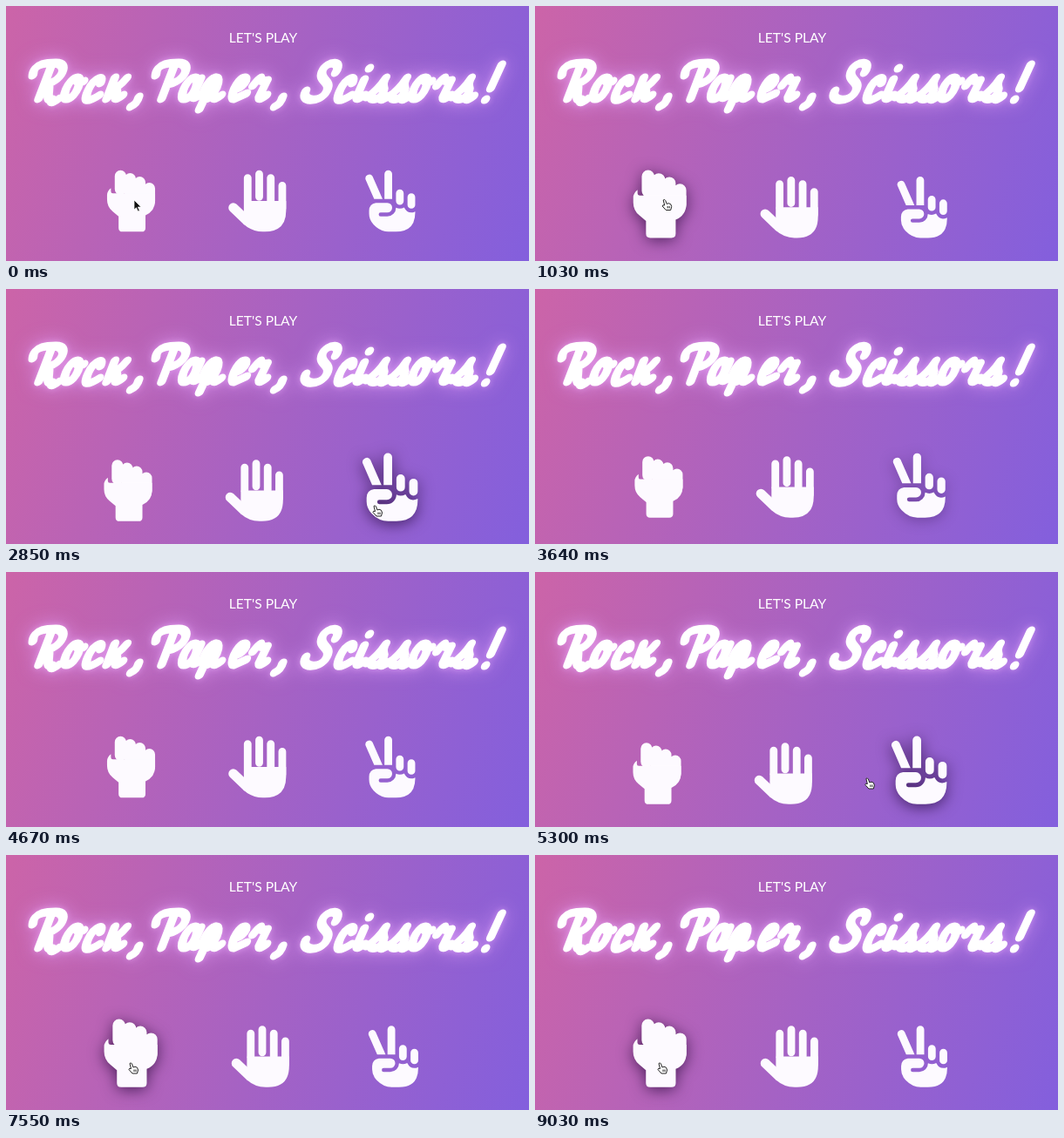
An HTML page for the animation above (9.06 s loop, 600x293 px).

```html
<!DOCTYPE html>
<html lang="en">
<head>
<meta charset="utf-8">
<title>Rock, Paper, Scissors!</title>
<style>
  html, body { margin: 0; width: 100%; height: 100%; overflow: hidden; }
  body { background: linear-gradient(108deg, #cc64a8, #a562c4 52%, #835fdd); }
  svg { display: block; width: 600px; height: 293px; }
  text { font: 15.6px Lato, "Open Sans", sans-serif; fill: #fff; text-anchor: middle; }
  #title { fill: none; stroke: #fff; stroke-width: 10; stroke-linecap: round; stroke-linejoin: round;
    filter: drop-shadow(0 0 3px #efb0ff80) drop-shadow(0 0 10px #e8a4ffa0); }
  .hand { fill: #fdfaff; }
  .fingers { fill: none; stroke: #fdfaff; stroke-linecap: round; }
  #pointer { fill: #fff; stroke: #222; stroke-linejoin: round; }
  #arrow { fill: #111; stroke: #fff; stroke-width: .7; }
</style>
</head>
<body>
<svg viewBox="0 0 600 293">
  <text x="295" y="41.8">LET'S PLAY</text>
  <g id="title" role="img" aria-label="Rock, Paper, Scissors!"></g>
  <g id="hands"></g>
  <g id="cursor">
    <path id="arrow" d="M0 0V11L2.500 8.700 4.500 13 6.300 12.200 4.400 8H8Z"/>
    <path id="pointer" d="M-4-5.500Q-2.500-7-1.500-5L0-1 2-1.800 4.500-.8 5.500 2 4.500 6H-1L-5 1.500Q-5-.5-2.500.5ZM1 1.500v2.500M3 1.500v2.500"/>
  </g>
</svg>
<script>
const LOOP = 9060, WAKE = 760, EASE = 300;
const $ = id => document.getElementById(id);

// Letters: advance and brush stroke, upright, baseline at 0
const cap = 'M2-40V-4M-15-31C-20-45-4-45 4-45C24-45 20-22 3-21';
const bowl = 'M6-28C-2-28-4-4 5-4S15-28 6-28';
const flick = 'q2 6 8-1';
const glyphs = {
  R: [30, cap + 'C13-20 8-3 17-3' + flick],
  P: [24, cap],
  S: [32, 'M20-34C24-48 4-48 4-36S20-25 18-12S-8 0-6-13'],
  o: [24, bowl + 'q4 7 10 4'],
  c: [21, 'M12-22C12-31 2-29 1-14S8-1 16-8'],
  k: [28, 'M5-28V-4M19-28Q14-16 6-15Q15-15 14-7' + flick],
  a: [24, bowl + 'M14-27L13-8' + flick],
  p: [31, 'M5-28L2 8' + bowl + 'M13-7' + flick],
  e: [22, 'M2-15C12-15 15-27 8-28S-1-4 7-4T18-10'],
  r: [26, 'M0-19Q3-27 5-28Q7-23 14-25L12-7' + flick],
  i: [17, 'M3-26L2-7' + flick + 'M4-39v.1'],
  s: [24, 'M-3-6Q6-14 10-28Q8-21 13-14C16-4 4 0 1-7M13-6' + flick],
  ',': [38, 'M13-6Q14 2 8 5'],
  '!': [10, 'M15-43L13-16M12-3v.1'],
  ' ': [5, '']
};
let pen = 34;
for (const letter of 'Rock,Paper, Scissors!') {
  const [advance, stroke] = glyphs[letter];
  $('title').innerHTML += `<path transform="translate(${pen} 110.5) skewX(-21)" d="${stroke}"/>`;
  pen += advance;
}

// Hands live on a 512-unit grid; fingers are evenly spaced round-capped lines
const fingers = (x, step, width, tops, length) =>
  `<path class="fingers" stroke-width="${width}" d="${
    tops.map((y, i) => `M${x + step * i} ${y}v${length}`).join('')}"/>`;
const shapes = [
  fingers(144, 80, 96, [48, 72, 100, 152], 110) +
    '<path d="M64 149V176Q64 192 80 192H432V256Q432 340 352 375V480Q352 512 320 512H160Q128 512 128 480V384L78 342Q32 304 32 244V206Q32 175 64 149Z"/>',
  fingers(160, 96, 64, [64, 32, 64, 128], 190) +
    '<path class="fingers" stroke-width="80" d="M40 312L152 419"/>' +
    '<path d="M128 256H480V336Q480 512 304 512H285Q195 512 125 448L128 340Z"/>',
  fingers(320, 96, 64, [192, 224], 64) +
    '<path d="M192 240V32a32 32 0 0 1 64 0V240ZM93 51L176 240H106L35 77A32 32 0 0 1 93 51Z' +
    'M120 272H216a40 40 0 0 1 0 80H160a16 16 0 0 0 0 32H216a72 72 0 0 0 72-72Q322 329 356 310Q388 372 448 344V352Q448 512 288 512H226Q158 512 102 454Q64 415 64 363V336Q66 279 120 272Z"/>'
];
$('hands').innerHTML = shapes.map(s => `<g class="hand">${s}</g>`).join('');
const hands = [...$('hands').children];
const homes = [146.8, 290.5, 443];

// Cursor key points: time, x, y
const path = [
  [WAKE, 147, 223], [1600, 160, 240], [1790, 266, 240], [2400, 350, 248], [2600, 426, 255],
  [3300, 426, 255], [3700, 430, 310], [4650, 430, 310], [5050, 428, 250], [5300, 384, 243],
  [6150, 265, 242], [6330, 173, 241], [6450, 146, 245]
];
function cursorAt(t) {
  const i = path.findIndex(p => p[0] > t);
  if (i < 1) return path[i ? path.length - 1 : 0].slice(1);
  const [a, x, y] = path[i - 1], [b, x2, y2] = path[i];
  const u = (t - a) / (b - a);
  return [x + (x2 - x) * u, y + (y2 - y) * u];
}

// Index of the hand under the cursor, or -1
function hovered(t) {
  const [x, y] = cursorAt(t);
  if (t < WAKE || y > 285) return -1;
  return x < 216 ? 0 : x < 365 ? 1 : 2;
}

// Each hand's size is its share of the recent hover time, newest weighted most
function growth(t) {
  const sizes = [0, 0, 0], n = 40;
  for (let j = 0; j < n; j++) {
    const i = hovered(t - EASE * (j / n) ** 1.4);
    if (i >= 0) sizes[i] += 1 / n;
  }
  return sizes;
}

function draw(now) {
  const t = now % LOOP;
  const sizes = growth(t);
  const base = 259.3 + 7.5 * Math.max(...sizes);
  // Growing hands push their neighbours apart around the centre
  let push = -3.5 * sizes.reduce((a, b) => a + b);
  hands.forEach((hand, i) => {
    const s = sizes[i];
    hand.setAttribute('transform', `translate(${homes[i] + push + 3.5 * s} ${base})
      scale(${.1377 * (1 + .11 * s)}) translate(-256 -512)`);
    hand.style.filter = s ? `drop-shadow(0 20px 55px rgba(25,0,45,${.65 * s}))` : 'none';
    push += 7 * s;
  });
  $('cursor').setAttribute('transform', `translate(${cursorAt(t)})`);
  $('arrow').style.display = t < WAKE ? '' : 'none';
  $('pointer').style.display = t < WAKE ? 'none' : '';
  requestAnimationFrame(draw);
}
requestAnimationFrame(draw);
</script>
</body>
</html>
```
